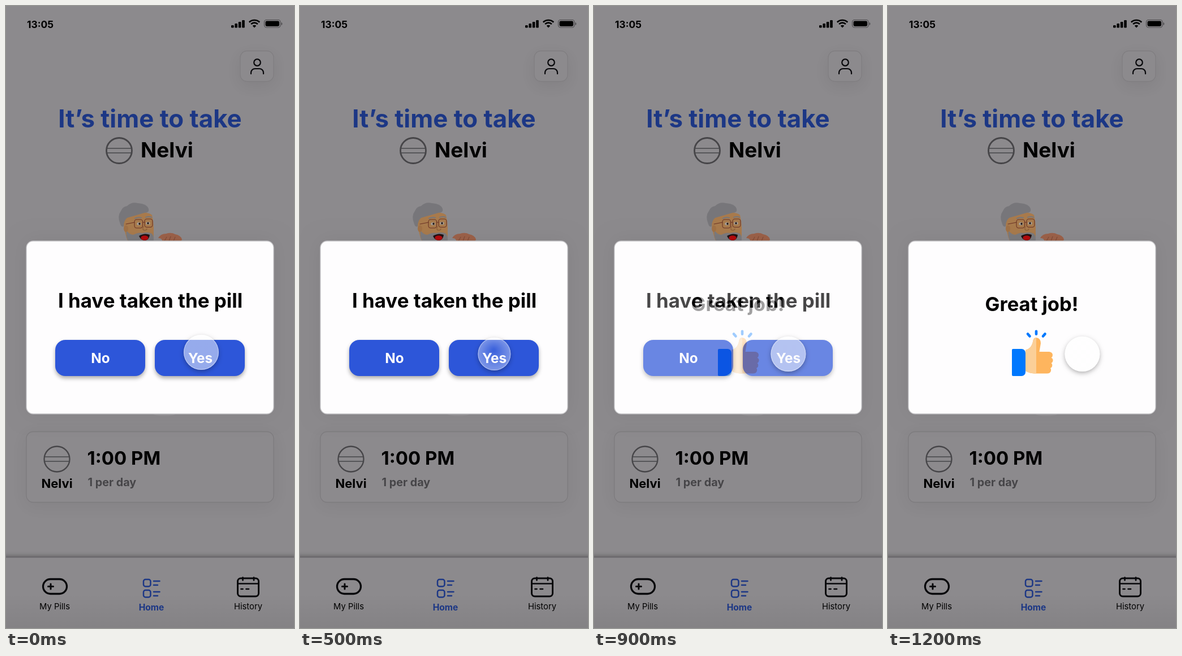
Write an HTML page with a canvas that moves like this. It is 509 px wide and 1101 px high and loops after 3.8 s.

```html
<!DOCTYPE html>
<html lang="en">
<head>
<meta charset="utf-8">
<title>Pill reminder</title>
<style>
html, body { margin: 0; width: 100%; height: 100%; overflow: hidden; background: #8c8a8d; }
canvas { display: block; width: 509px; height: 1101px; }
</style>
</head>
<body>
<canvas id="stage" width="509" height="1101"></canvas>
<script>
const W = 509, H = 1101, LOOP = 3800, STEP = 100;
const BLUE = '#2e58da', NAVY = '#1c3785', PAPER = '#fefdfe', BASE = '#8c8a8d';
const FONT = 'Inter, "Open Sans", sans-serif';
const MED = 'Nelvi';
const stage = document.getElementById('stage').getContext('2d');

function layer(draw) {
  const c = document.createElement('canvas');
  c.width = W;
  c.height = H;
  draw(c.getContext('2d'));
  return c;
}

function text(g, str, x, y, size, color = '#000', weight = 700, align = 'center') {
  g.font = `${weight} ${size}px ${FONT}`;
  g.textAlign = align;
  g.fillStyle = color;
  g.fillText(str, x, y);
}

function box(g, x, y, w, h, r, fill, line, width = 1) {
  g.beginPath();
  g.roundRect(x, y, w, h, r);
  if (fill) { g.fillStyle = fill; g.fill(); }
  if (line) { g.strokeStyle = line; g.lineWidth = width; g.stroke(); }
}

function disc(g, x, y, rx, ry, fill) {
  g.beginPath();
  g.ellipse(x, y, rx, ry, 0, 0, 7);
  g.fillStyle = fill;
  g.fill();
}

function shape(g, d, fill) {
  g.fillStyle = fill;
  g.fill(new Path2D(d));
}

function stroke(g, d, color, width, cap = 'round') {
  g.strokeStyle = color;
  g.lineWidth = width;
  g.lineCap = cap;
  g.lineJoin = 'round';
  g.stroke(new Path2D(d));
}

function shaded(g, alpha, blur, dy, draw) {
  g.save();
  g.shadowColor = `rgba(0,0,0,${alpha})`;
  g.shadowBlur = blur;
  g.shadowOffsetY = dy;
  draw();
  g.restore();
}

function tablet(g, x, y, width) {
  g.beginPath();
  g.arc(x, y, 22.5, 0, 7);
  g.strokeStyle = '#464548';
  g.lineWidth = width;
  g.stroke();
  stroke(g, `M${x - 22} ${y - 4}h44m-44 8h44`, '#464548', 1.5, 'butt');
}

function statusBar(g) {
  text(g, '13:05', 60.5, 39, 17.4);
  for (let i = 0; i < 4; i++) box(g, 398 + i * 6.4, 34 - i * 3, 4.6, 4.5 + i * 3, 1.2, '#000');
  g.strokeStyle = '#000';
  g.lineWidth = 2.7;
  g.lineCap = 'butt';
  for (const r of [13, 8.3]) {
    g.beginPath();
    g.arc(439, 38, r, -Math.PI * 0.75, -Math.PI * 0.25);
    g.stroke();
  }
  shape(g, 'M439 38.5l-3.2-3.4a4.6 4.6 0 0 1 6.4 0z', '#000');
  box(g, 456.5, 24.5, 28.5, 13.5, 4, null, '#4d4b4e', 1.2);
  box(g, 458.5, 26.5, 24.5, 9.5, 2.4, '#000');
  shape(g, 'M486.5 29c2.4.6 2.4 4.4 0 5z', '#4d4b4e');
}

function grandpa(g) {
  shape(g, 'M207 378Q212 364 232 366Q252 364 258 370Q263 390 260 418H216Q209 402 207 378z', '#a87a4c');
  shape(g, 'M202 386Q196 372 203 363Q206 355 214 354Q222 346 233 349Q249 350 252 359Q254 366 245 366Q228 371 214 375Q208 380 208 390Q204 392 202 386z', '#77767a');
  shape(g, 'M213 397Q217 404 225 405Q234 400 241 402Q250 399 258 403Q263 410 260 418H217Q211 408 213 397z', '#7b7a7d');
  disc(g, 212, 394, 4, 6, '#a07146');
  shape(g, 'M235 407Q245 401 254 405Q253 414 246 415Q238 415 235 407z', '#1e1012');
  disc(g, 245, 410.5, 6.6, 4.2, '#b30a0c');
  stroke(g, 'M228 376q6-3 11-1m8-1q6-2 10 0', '#77767a', 2);
  disc(g, 235, 385.5, 3.6, 2.6, '#a5a09c');
  disc(g, 251, 384.5, 3.6, 2.6, '#a5a09c');
  disc(g, 236, 385.5, 1.6, 2, '#241712');
  disc(g, 251, 384.5, 1.6, 2, '#241712');
  box(g, 227, 378, 14.5, 15, 4, null, '#6b3325', 1.1);
  box(g, 245, 377, 14, 14.5, 4, null, '#6b3325', 1.1);
  stroke(g, 'M241.5 383h3.5M227 383l-15 3', '#6b3325', 1.1);
  stroke(g, 'M243 390q-3 7 2 7q4 0 4-3', '#8a5c36', 1.1);
  shape(g, 'M269 411Q273 403 283 403Q292 400 299 404Q309 406 311 413L309 418H277Q276 410 269 411z', '#9c6149');
  stroke(g, 'M284 409l-4 7m11-8l-3 8m11-7l-3 7', '#7f4b38', 1.1);
}

function navBar(g) {
  shaded(g, 0.35, 8, -2, () => box(g, -10, 976, W + 20, 140, 0, BASE));
  const fade = g.createLinearGradient(0, 1040, 0, H);
  fade.addColorStop(0, 'rgba(0,0,0,0)');
  fade.addColorStop(1, 'rgba(0,0,0,.06)');
  box(g, 0, 1040, W, 61, 0, fade);
  box(g, 0, 974.5, W, 2, 0, '#6b696c');

  box(g, 65.5, 1014.5, 42, 26, 13, null, '#08080b', 3.3);
  stroke(g, 'M74.5 1027.5h9m-4.5-4.5v9', '#08080b', 3);
  text(g, 'My Pills', 86, 1068, 14.8, '#000', 400);

  for (const y of [1015, 1034]) {
    box(g, 243, y, 12.5, 12.5, 3.5, null, NAVY, 2.5);
    stroke(g, `M261 ${y + 3}h10.5m-10.5 7h7`, NAVY, 2.5);
  }
  text(g, 'Home', 257, 1070, 15.6, NAVY);

  box(g, 409.5, 1013, 37, 32, 5.5, null, '#08080b', 3);
  stroke(g, 'M410 1022.5h36M418.5 1011.5v5M438 1011.5v5M415.5 1032h3m6 0h4.5', '#08080b', 2.7);
  text(g, 'History', 428, 1068, 14.8, '#000', 400);
}

const screen = layer(g => {
  box(g, 0, 0, W, H, 0, BASE);
  statusBar(g);
  shaded(g, 0.07, 26, 8, () => box(g, 414, 79.5, 59, 54, 12, BASE, '#807e81', 1.3));
  stroke(g, 'M433 120v-2a7 7 0 0 1 7-7h8a7 7 0 0 1 7 7v2', '#08080b', 2.2);
  stroke(g, 'M449.8 100a5.8 5.8 0 1 1-11.6 0a5.8 5.8 0 1 1 11.6 0', '#08080b', 2.2);

  text(g, 'It’s time to take', 254.5, 215, 43.8, NAVY);
  tablet(g, 200, 256, 2.8);
  text(g, MED, 238, 268, 37, '#000', 700, 'left');
  grandpa(g);

  shaded(g, 0.06, 30, 6, () => box(g, 36, 753.5, 437, 125, 12, BASE, '#7d7b7e', 1.3));
  tablet(g, 90, 802, 2.3);
  text(g, MED, 90, 853, 22);
  text(g, '1:00 PM', 143.5, 812, 33, '#000', 700, 'left');
  text(g, '1 per day', 144.5, 850, 19.8, '#464548', 700, 'left');
  navBar(g);

  shaded(g, 0.07, 34, 0, () => box(g, 36, 416, 437, 306, 12, PAPER));
  disc(g, 280, 722, 20, 3.5, '#908e91');
  box(g, 36, 416, 437, 306, 12, PAPER, '#c4c3c6', 1.3);
});

// Colour negatives on black, so faded layers add up as ink on paper.
function ink(draw) {
  return layer(g => {
    box(g, 0, 0, W, H, 0, '#fff');
    draw(g);
    g.globalCompositeOperation = 'difference';
    box(g, 0, 0, W, H, 0, '#fff');
  });
}

const question = ink(g => {
  text(g, 'I have taken the pill', 255, 534, 34.9);
  for (const [label, x, mid] of [['No', 87, 167], ['Yes', 263, 343.5]]) {
    shaded(g, 0.32, 7, 4, () => box(g, x, 591, 159, 64, 18, BLUE));
    text(g, label, mid, 632, 24.3, '#fff');
  }
});

const praise = ink(g => {
  text(g, 'Great job!', 254, 540, 34.6);
  const hand = new Path2D('M243 609C251 607 255 601 256.5 592Q257.5 587 262 587Q270 588 270 597L267.5 612H285' +
    'Q291 613 291 618Q291 621 288.5 622.5Q292 624 291.5 628Q291 631 288.5 632Q291 634 290 638Q289.5 640 287 641' +
    'Q289 643 288 646Q286.5 650.5 281 650.5H258Q250 650 243 646z');
  g.save();
  g.clip(hand);
  box(g, 240, 580, 60, 80, 0, '#ffb75f');
  box(g, 240, 580, 22, 80, 0, '#fcd199');
  g.restore();
  box(g, 219, 607, 24, 48, [2, 7, 7, 2], '#007aff');
  stroke(g, 'M262 575.8v5M247 580.5l3.5 4M277.5 580.5l-3.5 4', '#007aff', 4.6);
});

const card = document.createElement('canvas');
card.width = W;
card.height = H;
const cg = card.getContext('2d');

function mix(oldAlpha, newAlpha) {
  cg.globalCompositeOperation = 'source-over';
  box(cg, 0, 0, W, H, 0, '#010201');
  cg.globalCompositeOperation = 'lighter';
  cg.globalAlpha = oldAlpha;
  cg.drawImage(question, 0, 0);
  cg.globalAlpha = newAlpha;
  cg.drawImage(praise, 0, 0);
  cg.globalAlpha = 1;
  cg.globalCompositeOperation = 'difference';
  box(cg, 0, 0, W, H, 0, '#fff');
}

function touch(g, x, y, r, press) {
  g.save();
  g.beginPath();
  g.rect(0, 0, W, H);
  g.arc(x, y, r, 0, 7);
  g.clip('evenodd');
  shaded(g, 0.32, 9, 3, () => disc(g, x, y, r - 0.5, r - 0.5, '#fff'));
  g.restore();
  const glow = g.createRadialGradient(x - 1, y - 7, 2, x, y, r);
  glow.addColorStop(0, `rgba(255,255,255,${0.5 - press * 0.42})`);
  glow.addColorStop(1, `rgba(255,255,255,${0.5 - press * 0.12})`);
  disc(g, x, y, r, r, glow);
  g.beginPath();
  g.arc(x, y, r - 0.6, 0, 7);
  g.strokeStyle = 'rgba(255,255,255,.36)';
  g.lineWidth = 1.2;
  g.stroke();
}

const FADE_OUT = [0.955, 0.715, 0.28, 0.04, 0];
const FADE_IN = [0.04, 0.37, 0.86, 0.98, 1];

function draw(time) {
  const t = Math.floor(time % LOOP / STEP) * STEP;
  const i = Math.min(4, t / STEP - 8);
  mix(i < 0 ? 1 : FADE_OUT[i], i < 0 ? 0 : FADE_IN[i]);
  stage.drawImage(screen, 0, 0);
  // Only the card's inner part, well inside its rounded corners.
  stage.drawImage(card, 60, 490, 389, 200, 60, 490, 389, 200);

  const slide = Math.min(1, t / 300);
  const press = t === 400 ? 0.5 : t === 500 ? 1 : 0;
  touch(stage, 345 - slide * 1.6, 613 + slide * 3, 31 - press * 2, press);
}

const start = performance.now();
function tick() {
  draw(performance.now() - start);
  requestAnimationFrame(tick);
}
tick();
</script>
</body>
</html>
```
